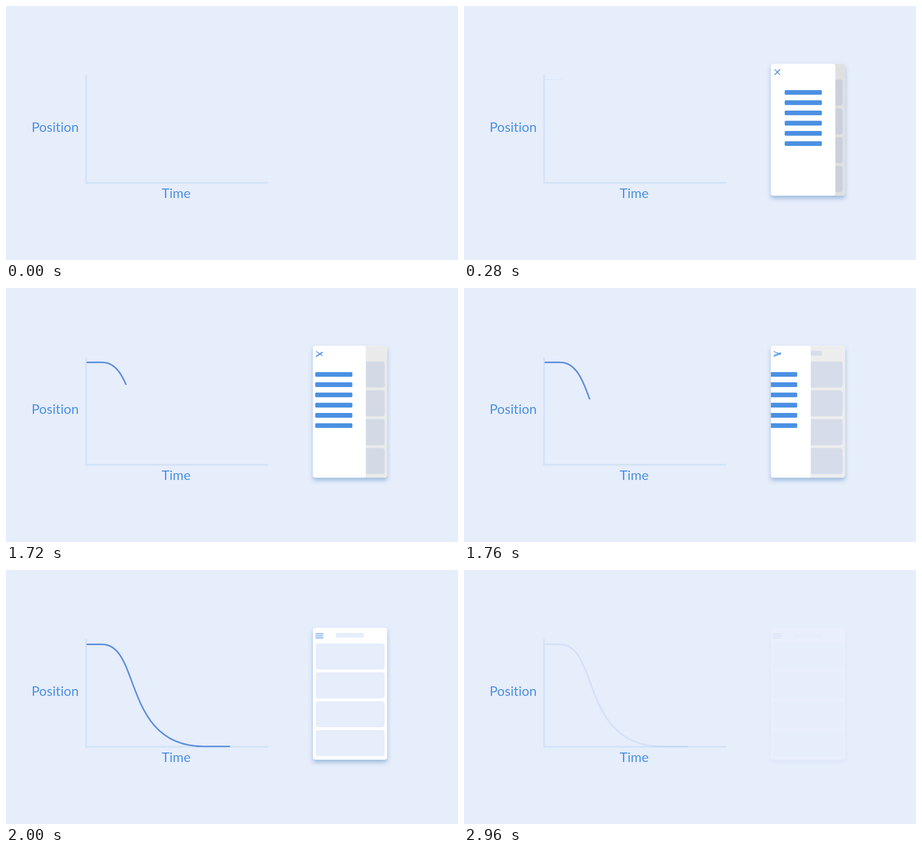
Animation, 998 px wide and 561 px high, one loop 3 s. Source, as an HTML page with a canvas:

```html
<!DOCTYPE html>
<html lang="en">
<head>
<meta charset="utf-8">
<title>Drawer easing</title>
<style>
html, body { margin: 0; width: 100%; height: 100%; overflow: hidden; background: #e6edfb; }
canvas { display: block; }
</style>
</head>
<body>
<canvas id="stage" width="998" height="561"></canvas>
<script>
const W = 998, H = 561, LOOP = 3000, STEP = 40;
const BG = '#e6edfb', BLUE = '#4a90e2', AXIS = '#d3e3f6', CURVE = '#6090db';
const PHONE = { x: 677.7, y: 127.6, w: 163.8, h: 291.4 };
const DRAWER_W = 142.2;

const stage = document.getElementById('stage').getContext('2d');
const layer = Object.assign(document.createElement('canvas'), { width: W, height: H });
const ctx = layer.getContext('2d');

const clamp = v => Math.min(1, Math.max(0, v));
const mix = (a, b, p) => a + (b - a) * p;
const smooth = u => u * u * (3 - 2 * u);

// Cubic ease with handles (x1, 0) and (x2, 1)
function ease(u, x1, x2) {
  if (u <= 0 || u >= 1) return clamp(u);
  let lo = 0, hi = 1;
  for (let i = 0; i < 30; i++) {
    const s = (lo + hi) / 2, r = 1 - s;
    if (3 * r * r * s * x1 + 3 * r * s * s * x2 + s * s * s < u) lo = s;
    else hi = s;
  }
  return smooth(lo);
}

function box(c, x, y, w, h, r, fill) {
  c.beginPath();
  c.roundRect(x, y, w, h, r);
  c.fillStyle = fill;
  c.fill();
}

function label(text, x, y) {
  stage.font = '29.2px Lato, "Open Sans", sans-serif';
  stage.letterSpacing = '0.1px'; // keeps "ti" from joining
  stage.fillStyle = BLUE;
  stage.fillText(text, x + stage.measureText(text).actualBoundingBoxLeft, y);
}

function drawAxes() {
  stage.fillStyle = BG;
  stage.fillRect(0, 0, W, H);
  stage.strokeStyle = AXIS;
  stage.lineWidth = 3.8;
  stage.beginPath();
  stage.moveTo(176.8, 152.5);
  stage.lineTo(176.8, 390.5);
  stage.lineTo(579, 390.5);
  stage.stroke();
  label('Position', 58.5, 278);
  label('Time', 343.7, 423.5);
}

function drawCurve(u) {
  const x0 = 212, x1 = 437, y0 = 164.3, y1 = 389.6;
  ctx.save();
  ctx.beginPath();
  ctx.rect(0, 0, W, mix(162.3, 400, smooth(u)));
  ctx.clip();
  ctx.beginPath();
  ctx.moveTo(178, y0);
  ctx.lineTo(x0, y0);
  ctx.bezierCurveTo(mix(x0, x1, 0.385), y0, mix(x0, x1, 0.2), y1, x1, y1);
  ctx.lineTo(494.6, y1);
  ctx.strokeStyle = CURVE;
  ctx.lineWidth = 3.4;
  ctx.stroke();
  ctx.restore();
}

function stroke(cx, cy, angle) {
  const dx = 8.6 * Math.cos(angle), dy = 8.6 * Math.sin(angle);
  ctx.beginPath();
  ctx.moveTo(cx - dx, cy - dy);
  ctx.lineTo(cx + dx, cy + dy);
  ctx.stroke();
}

function drawIcon(p) {
  const a = mix(Math.PI / 4, 0, p);
  ctx.strokeStyle = BLUE;
  ctx.lineWidth = 1.6;
  stroke(691.9, mix(146, 141.2, p), a);
  stroke(691.9, mix(146, 145.6, p), -a);
  stroke(691.9, mix(146, 150, p), -a);
}

function drawPhone(u) {
  const { x, y, w, h } = PHONE;
  ctx.save();
  ctx.shadowColor = 'rgba(95, 145, 195, 0.53)';
  ctx.shadowBlur = 10;
  ctx.shadowOffsetY = 6;
  box(ctx, x, y, w, h, 5, '#fff');
  ctx.restore();

  ctx.save();
  ctx.beginPath();
  ctx.roundRect(x, y, w, h, 5);
  ctx.clip();
  box(ctx, 729, 139, 61, 10.5, 2.5, BG);
  for (let i = 0; i < 4; i++) box(ctx, 684, 162.2 + 63.75 * i, 152, 57.5, 5, BG);
  ctx.fillStyle = `rgba(0, 0, 0, ${0.12 * (1 - u)})`;
  ctx.fillRect(x, y, w, h);

  const edge = x + DRAWER_W - (DRAWER_W + 0.5) * ease(u, 0.53, 0.33);
  if (u < 1) {
    box(ctx, x - 200, y, edge - x + 200, h, 5, '#fff');
    for (let i = 0; i < 6; i++) {
      box(ctx, edge - 111.8, 185.7 + 22.6 * i, 82, 10.4, 2.5, BLUE);
    }
  }
  ctx.restore();
  drawIcon(ease(u, 0.5, 0.2));
}

function draw(t) {
  const u = clamp((t - 1600) / 400);
  const alpha = Math.min(clamp(t / 280), clamp((2995 - t) / 270));
  drawAxes();
  ctx.clearRect(0, 0, W, H);
  drawCurve(u);
  drawPhone(u);
  stage.globalAlpha = alpha;
  stage.drawImage(layer, 0, 0);
  stage.globalAlpha = 1;
}

const start = performance.now();
function tick() {
  const t = (performance.now() - start) % LOOP;
  draw(Math.floor(t / STEP) * STEP);
  requestAnimationFrame(tick);
}
tick();
</script>
</body>
</html>
```
